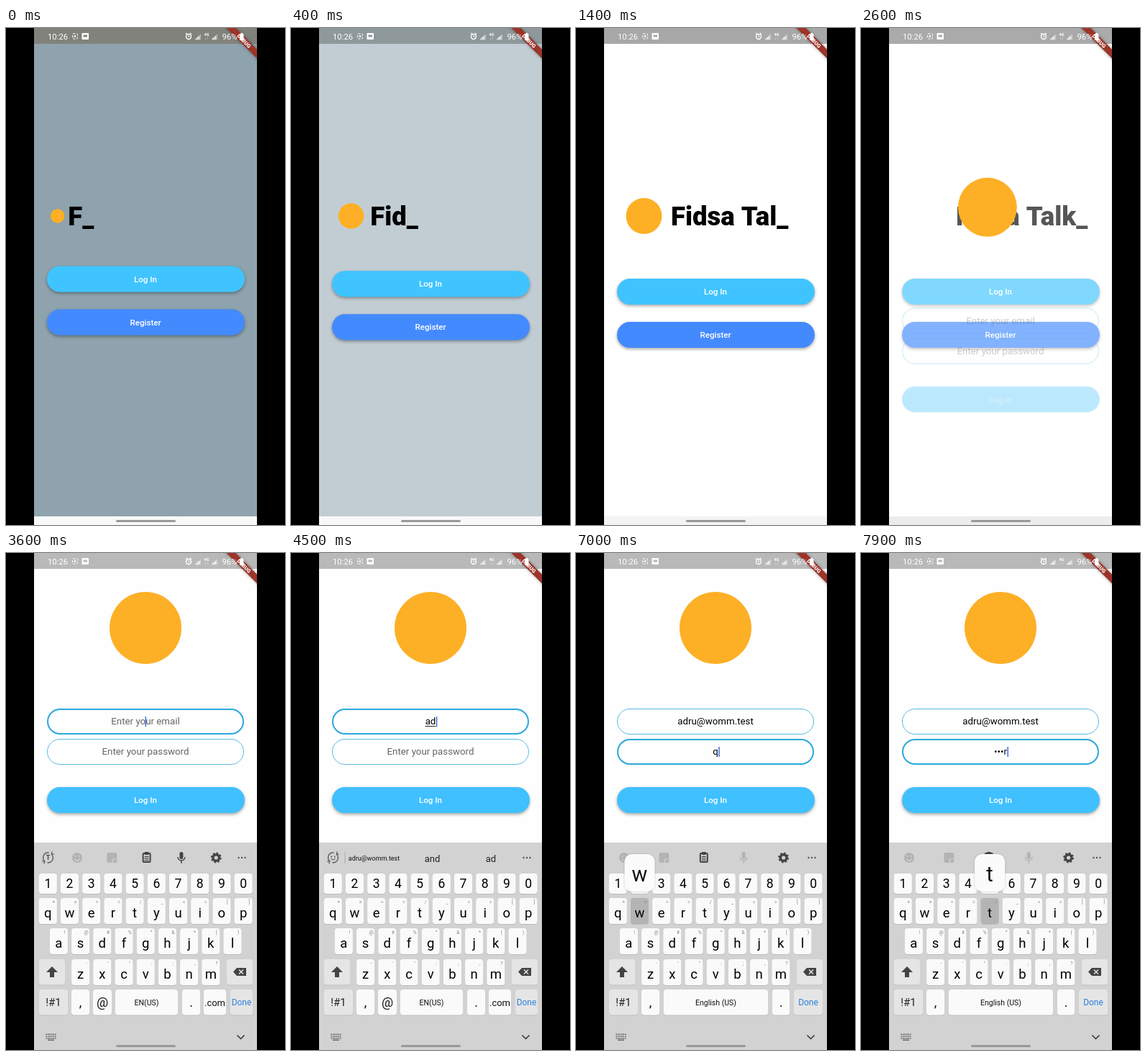
These frames come from a looping animation (388 px wide and 690 px high, 8 s). An HTML page with a canvas:

```html
<!DOCTYPE html>
<html lang="en">
<head>
<meta charset="utf-8">
<title>Login flow</title>
<style>
html, body { margin: 0; width: 100%; height: 100%; overflow: hidden; background: #000; }
canvas { display: block; width: 388px; height: 690px; }
</style>
</head>
<body>
<canvas id="stage"></canvas>
<script>
const LOOP = 8000, W = 388, H = 690;
const canvas = document.getElementById('stage');
const g = canvas.getContext('2d');
const dpr = window.devicePixelRatio || 1;
canvas.width = W * dpr;
canvas.height = H * dpr;

const TITLE = 'Fidsa Talk', EMAIL = 'adru@womm.test';
const PUSH = 2445, FOCUS = 3200, PICK = 5000, NEXT = 5700;
const PRESSES = [[3950, 'a'], [4250, 'd'], [6600, 'q'], [6950, 'w'], [7250, 'e'], [7550, 'r'], [7850, 't']];
const KEY_DELAY = 100, POPUP = 130, PITCH = 30.2;

const clamp = v => Math.max(0, Math.min(1, v));
const span = (t, a, b) => clamp((t - a) / (b - a));
const lerp = (a, b, p) => a + (b - a) * p;
const mix = (a, b, p) => `rgb(${a.map((v, i) => Math.round(lerp(v, b[i], p)))})`;

// CSS-style cubic easing
function bezier(x1, y1, x2, y2) {
  const f = (a, b, s) => 3 * a * s * (1 - s) ** 2 + 3 * b * s * s * (1 - s) + s ** 3;
  return x => {
    let lo = 0, hi = 1;
    for (let i = 0; i < 22; i++) {
      const m = (lo + hi) / 2;
      if (f(x1, x2, m) < x) lo = m; else hi = m;
    }
    return f(y1, y2, lo);
  };
}
const fastOut = bezier(.4, 0, .2, 1);
const easeIn = bezier(.42, 0, 1, 1);

function rect(x, y, w, h, color, r = 0) {
  g.fillStyle = color;
  g.beginPath();
  g.roundRect(x, y, w, h, r);
  g.fill();
}
function shadowRect(x, y, w, h, color, r, alpha, blur, drop) {
  g.save();
  g.shadowColor = `rgba(0,0,0,${alpha})`;
  g.shadowBlur = blur * dpr;
  g.shadowOffsetY = drop * dpr;
  rect(x, y, w, h, color, r);
  g.restore();
}
function outline(x, y, w, h, color, r, lw) {
  g.strokeStyle = color;
  g.lineWidth = lw;
  g.beginPath();
  g.roundRect(x + lw / 2, y + lw / 2, w - lw, h - lw, r);
  g.stroke();
}
function disc(x, y, r, color) {
  g.fillStyle = color;
  g.beginPath();
  g.arc(x, y, r, 0, 7);
  g.fill();
}
function line(color, lw, ...p) {
  g.strokeStyle = color;
  g.lineWidth = lw;
  g.beginPath();
  for (let i = 0; i < p.length; i += 2) g.lineTo(p[i], p[i + 1]);
  g.stroke();
}
function polygon(color, points) {
  g.fillStyle = color;
  g.beginPath();
  for (const [x, y] of points) g.lineTo(x, y);
  g.fill();
}
function ring(x, y, r, color, lw, a = 0, b = 7) {
  g.strokeStyle = color;
  g.lineWidth = lw;
  g.beginPath();
  g.arc(x, y, r, a, b);
  g.stroke();
}
// y is the middle of the capitals; returns the text width
function text(s, x, y, size, color, align = 'center', weight = 400) {
  g.font = `${weight} ${size}px Roboto, "Liberation Sans", sans-serif`;
  g.textAlign = align;
  g.fillStyle = color;
  g.fillText(s, x, y + size * .356);
  return g.measureText(s).width;
}
function button(label, y, color) {
  // the shadow must not show through a translucent button
  shadowRect(57, y, 275, 36, color, 18, .35 * g.globalAlpha ** 2, 4, 2);
  text(label, 194, y + 18, 11.6, '#fff', 'center', 500);
}
const logo = (x, y, scale) => disc(x, y, 25 * scale, '#fdaf26');

function welcome(t) {
  const fade = clamp(.29 + t * .000815), grow = clamp(.39 + t * .0008);
  rect(39, 0, 310, 678, mix([96, 125, 139], [255, 255, 255], fade));
  const row = 75 * grow, top = 330.5 + Math.max(0, row - 40) / 2;
  if (t < PUSH) logo(57 + row / 2, 261, grow);
  const n = Math.min(TITLE.length, 1 + Math.floor(t / 165));
  text(TITLE.slice(0, n) + '_', 57 + row, 261, 36.5, '#000', 'left', 900);
  button('Log In', top, '#40c4ff');
  button('Register', top + 60, '#448aff');
}

function cursor(t, since, x, y) {
  if ((t - since) % 1000 < 500) rect(x, y - 7, 1.5, 14, '#3f6fe0');
}

function field(y, value, hint, focused, t, since, underline) {
  outline(57, y - 18, 274, 36, focused ? '#2ba8dc' : '#5ab8e2', 18, focused ? 2 : 1);
  const w = text(value || hint, 194, y - .5, 13.3, value ? '#000' : '#666');
  if (!focused) return;
  if (underline) rect(194 - w / 2, y + 6, w, 1, '#222');
  cursor(t, since, value ? 194 + w / 2 + .5 : 193.5, y);
}

function login(t, lift) {
  const p = span(t, PUSH, PUSH + 300), q = fastOut(p);
  const typed = PRESSES.filter(([at]) => t >= at + KEY_DELAY);
  const last = typed.length ? typed[typed.length - 1][0] + KEY_DELAY : 0;
  const name = t >= PICK ? EMAIL : typed.slice(0, 2).map(k => k[1]).join('');
  const secret = typed.slice(2).map((k, i, all) => i < all.length - 1 ? '•' : k[1]).join('');
  const up = 138 * lift;

  g.save();
  g.globalAlpha = easeIn(p);
  g.translate(0, 172 * (1 - q));
  rect(39, 0, 310, 678, '#fefefe');
  g.translate(0, -up);
  const emailSince = Math.max(FOCUS, last, t >= PICK ? PICK : 0);
  field(372, name, 'Enter your email', t >= FOCUS && t < NEXT, t, emailSince, t < PICK && name);
  field(414, secret, 'Enter your password', t >= NEXT, t, Math.max(NEXT, last));
  button('Log In', 463, '#40c0ff');
  g.restore();
  logo(lerp(94.5, 194, q ** .9), lerp(261, 242, q * q) - up, 1 + q * q);
}

const ICONS = {
  smile(x, y, c) {
    disc(x, y, 7, c);
    disc(x - 2.5, y - 2, 1, '#d2d2d2');
    disc(x + 2.5, y - 2, 1, '#d2d2d2');
    ring(x, y + .5, 3.5, '#d2d2d2', 1.2, .2, 2.9);
  },
  sticker(x, y, c) {
    rect(x - 7, y - 7, 14, 14, c, 2);
    line('#d2d2d2', 1.2, x + 1, y + 7, x + 1, y + 2, x + 7, y + 2);
  },
  clip(x, y, c) {
    outline(x - 6, y - 7, 12, 14, c, 1, 2);
    rect(x - 3, y - 8, 6, 4, c, 1);
    for (const d of [-1.5, 1, 3.5]) line(c, 1.2, x - 3, y + d, x + 3, y + d);
  },
  mic(x, y, c) {
    rect(x - 2.5, y - 8, 5, 10, c, 2.5);
    ring(x, y - 1, 5, c, 1.4, 0, Math.PI);
    line(c, 1.4, x, y + 4, x, y + 8);
  },
  gear(x, y, c) {
    ring(x, y, 4.3, c, 3.4);
    g.setLineDash([2.6, 2.2]);
    ring(x, y, 6.2, c, 2.4, 0, Math.PI * 2);
    g.setLineDash([]);
  },
};

function toggleIcon(face) {
  ring(58.5, 423, 7, '#555', 1.3, -.9, 1.7);
  ring(58.5, 423, 7, '#555', 1.3, 2.2, 4.9);
  line('#555', 1.2, 64, 414.5, 63.5, 418, 67, 418);
  line('#555', 1.2, 53, 431.5, 53.5, 428, 50, 428);
  if (!face) return text('T', 58.5, 423, 9, '#444', 'center', 700);
  disc(56.3, 421.5, .9, '#555');
  disc(60.7, 421.5, .9, '#555');
  ring(58.5, 423, 3, '#555', 1, .2, 2.9);
}

function toolbar(t) {
  for (const x of [323.5, 328, 332.5]) disc(x, 423, 1.2, '#555');
  if (t >= PRESSES[0][0] + KEY_DELAY && t < PICK) {
    const single = t < PRESSES[1][0] + KEY_DELAY;
    toggleIcon(true);
    rect(74.5, 415, 1, 16, '#aaa');
    text(EMAIL, 115.5, 423.5, 9, '#111');
    text(single ? 'a' : 'and', 196.5, 424, 13, '#222');
    text(single ? 'I' : 'ad', 278, 424, 13, '#222');
    return;
  }
  const secret = t >= NEXT, dark = '#444', faint = '#b3b3b3';
  if (!secret) toggleIcon(false);
  Object.keys(ICONS).forEach((name, i) => {
    const dim = i < 2 || (secret && name === 'mic');
    ICONS[name](secret ? 67 + 55.4 * i : 99 + 48.3 * i, 423, dim ? faint : dark);
  });
}

const ROWS = [
  { keys: '1234567890', alt: '', x: 58.3, y: 445, h: 28 },
  { keys: 'qwertyuiop', alt: '+×÷=/_<>[]', x: 58.3, y: 479, h: 36 },
  { keys: 'asdfghjkl', alt: '!@#%^&*()', x: 73.4, y: 521, h: 36 },
  { keys: 'zxcvbnm', alt: '-\'":;,?', x: 103.6, y: 564, h: 36 },
];

function key(x0, x1, label, size, color = '#111', fill = '#fafafa', y = 606) {
  rect(x0, y + 1, x1 - x0, 35.5, '#bdbdbd', 4);
  rect(x0, y, x1 - x0, 35.5, fill, 4);
  if (label) text(label, (x0 + x1) / 2, y + 18, size, color);
}

function keyboard(t, lift) {
  if (!lift) return;
  g.save();
  g.translate(0, 290 * (1 - lift));
  rect(39, 402, 310, 288, '#d2d2d2');
  toolbar(t);
  const press = PRESSES.find(([at]) => t >= at && t < at + POPUP);
  let pop;
  for (const { keys, alt, x, y, h } of ROWS) {
    [...keys].forEach((c, i) => {
      const cx = x + PITCH * i, down = press && press[1] === c;
      if (down) pop = [cx, y];
      rect(cx - 12.5, y + 1, 25, h, '#bdbdbd', 4);
      rect(cx - 12.5, y, 25, h, down ? '#b4b4b4' : '#fafafa', 4);
      text(c, cx, y + h / 2 + (alt ? 2.5 : 0), alt ? 18.5 : 17.5, '#000');
      if (alt) text(alt[i], cx + 8, y + 6, 7, '#888');
    });
  }

  const grey = '#e5e5e5';
  key(46, 82, '', 0, '', grey, 564);
  polygon('#444', [[64, 574], [72, 582], [67, 582], [67, 589], [61, 589], [61, 582], [56, 582]]);
  key(307, 343, '', 0, '', grey, 564);
  polygon('#444', [[316, 581.5], [321, 576], [334, 576], [334, 587], [321, 587]]);
  line('#eee', 1.3, 324, 578.5, 330, 584.5);
  line('#eee', 1.3, 330, 578.5, 324, 584.5);

  key(46, 86, '!#1', 15, '#222', grey);
  key(91, 116, ',', 18);
  if (t < NEXT) {
    key(121, 147, '@', 18);
    key(152, 239, 'EN(US)', 10.5);
    key(245, 270, '.', 18);
    key(275, 306, '.com', 13);
    key(312, 343, 'Done', 12, '#2f80e0', grey);
  } else {
    key(122, 267, 'English (US)', 10.5);
    key(273, 297, '.', 18);
    key(303, 343, 'Done', 12, '#2f80e0', grey);
  }

  for (let r = 0; r < 3; r++)
    for (let c = 0; c < 6; c++) rect(55.5 + c * 2.5, 667.5 + r * 2.7, 1.5, 1.5, '#555');
  rect(58, 675.5, 9, 1.3, '#555');
  line('#333', 1.5, 321.5, 669.5, 326.5, 674.5, 331.5, 669.5);

  if (pop) {
    const cx = Math.max(pop[0], 63);
    shadowRect(cx - 21, pop[1] - 61, 42, 52, '#fbfbfb', 10, .2, 3, 0);
    text(press[1], cx, pop[1] - 33, 29, '#111');
  }
  g.restore();
}

function bars(x) {
  for (let i = 0; i < 4; i++) rect(x + i * 2, 14.5 - i * 1.8, 1.4, 1.8 + i * 1.8, i < 3 ? '#fff' : 'rgba(255,255,255,.5)');
}

function banner() {
  g.save();
  g.translate(331, 18);
  g.rotate(Math.PI / 4);
  shadowRect(-40, -4.5, 80, 9, '#9c3429', 0, .4, 4, 0);
  text('DEBUG', 0, 0, 7.4, '#fff', 'center', 900);
  g.restore();
}

function statusBar(t) {
  const tint = t < 700 ? mix([130, 130, 125], [152, 170, 179], t / 700)
    : t < 2400 ? mix([152, 170, 179], [168, 168, 168], span(t, 700, 1100))
    : mix([168, 168, 168], [185, 185, 185], span(t, 2500, 3500));
  rect(39, 0, 310, 22, tint);
  banner();

  text('10:26', 58, 12, 11.3, '#fff', 'left');
  g.setLineDash([3, 2]);
  outline(92, 7.5, 8, 8, '#fff', 1, 1);
  g.setLineDash([]);
  rect(94.5, 10.5, 3, 2, '#fff');
  rect(105.5, 7, 9.5, 9, '#fff', 1);
  rect(107.5, 9.5, 5.5, 3, tint);
  ring(254, 12, 3.5, '#fff', 1.4);
  line('#fff', 1.2, 250, 8.5, 252, 7);
  line('#fff', 1.2, 258, 8.5, 256, 7);
  line('#fff', 1, 254, 10, 254, 12.3, 255.5, 12.3);
  bars(263.5);
  text('4G', 279, 9.5, 5.5, '#fff', 'center', 700);
  text('↓↑', 279, 14.5, 5, '#fff');
  bars(286.5);
  text('96%', 300.5, 12, 11.3, '#fff', 'left');
  rect(325, 8, 5.5, 9, '#fff', 1);
  rect(326.5, 6.8, 2.5, 1.5, '#fff');
}

function draw(t) {
  g.setTransform(dpr, 0, 0, dpr, 0, 0);
  rect(0, 0, W, H, '#000');
  g.save();
  g.beginPath();
  g.rect(39, 0, 310, H);
  g.clip();
  const lift = fastOut(span(t, FOCUS - 50, FOCUS + 250));
  welcome(t);
  if (t >= PUSH) login(t, lift);
  rect(39, 678, 310, 12, mix([248, 248, 248], [236, 236, 236], span(t, 700, 2400)));
  keyboard(t, lift);
  rect(153, 683, 83, 3, '#999', 1.5);
  statusBar(t);
  g.restore();
}

const start = performance.now();
function tick() {
  draw((performance.now() - start) % LOOP);
  requestAnimationFrame(tick);
}
tick();
</script>
</body>
</html>
```
